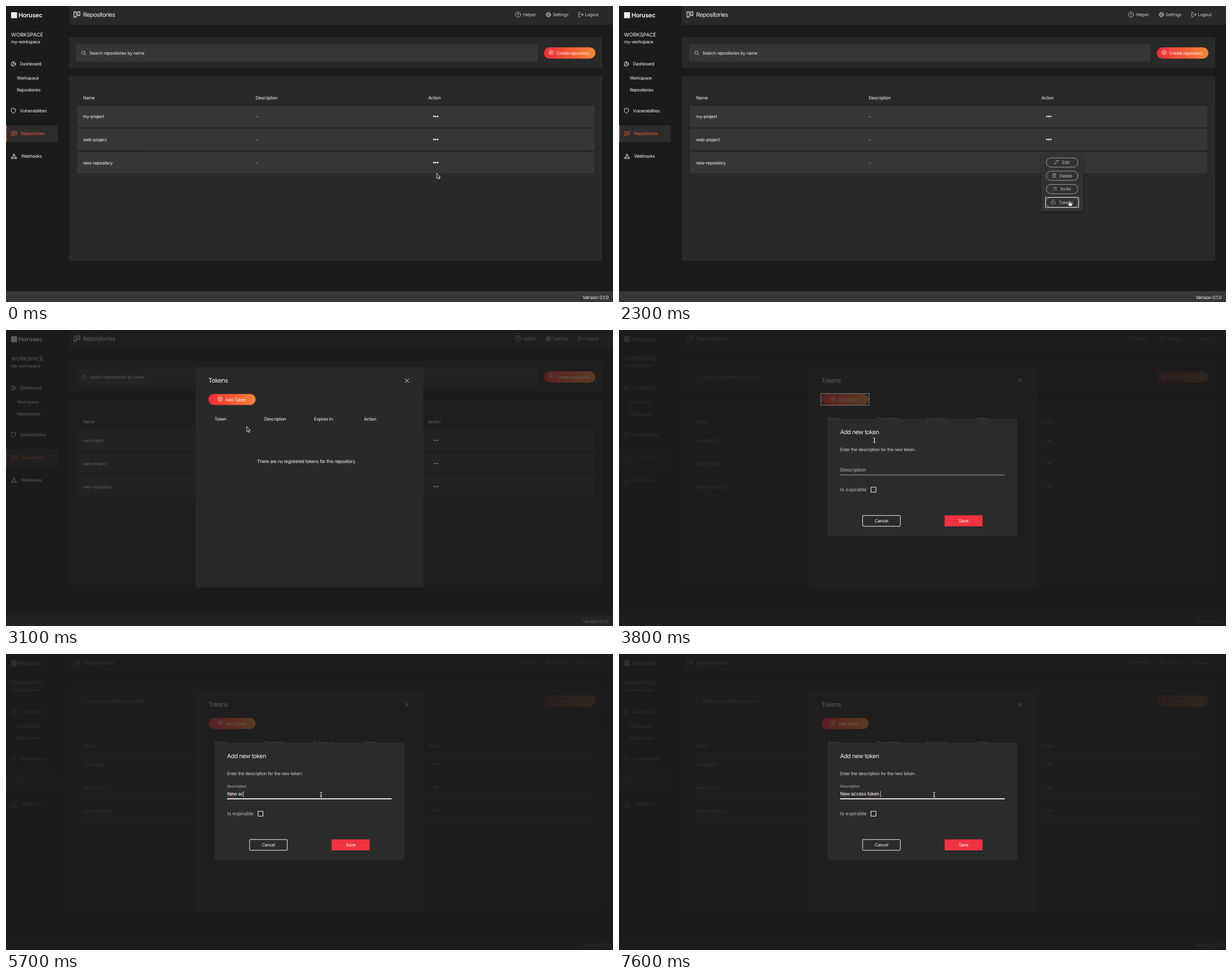
Write an HTML page that moves like this. It is 1071 by 523 pixels and loops after 8000 ms.

```html
<!DOCTYPE html>
<html lang="en">
<head>
<meta charset="utf-8">
<title>Repository tokens</title>
<style>
  html, body { margin: 0; width: 100%; height: 100%; overflow: hidden; background: #1a1c1b; }
  svg { display: block; width: 100vw; height: 100vh; }
  text { font-family: Inter, sans-serif; letter-spacing: -.04em; white-space: pre; text-rendering: geometricPrecision; }
  .form { font-family: "Liberation Sans", Arial, sans-serif; letter-spacing: .0094em; }
  .line { fill: none; stroke-width: .9; stroke-linecap: round; stroke-linejoin: round; }
</style>
</head>
<body>
<svg id="stage" viewBox="0 0 1071 523" preserveAspectRatio="none"></svg>
<script>
const LOOP = 8000, STEP = 100;
const WHITE = '#f4f4f4', SOFT = '#b6b8b8', PANEL = '#282a2a', ROW = '#353737', ACCENT = '#ee5435';

const rect = (x, y, w, h, fill, extra = '') =>
  `<rect x="${x}" y="${y}" width="${w}" height="${h}" fill="${fill}" ${extra}/>`;
// y is the middle of the capital letters
const text = (x, y, str, size = 7.8, fill = WHITE, extra = '') =>
  `<text x="${x}" y="${y + size * .36}" font-size="${size}" fill="${fill}" ${extra}>${str}</text>`;
const icon = (x, y, body, color = WHITE) =>
  `<g class="line" transform="translate(${x} ${y})" stroke="${color}">${body}</g>`;
const group = (id, body, extra = '') => `<g id="${id}" ${extra}>${body}</g>`;

const ICONS = {
  pie: '<circle r="4"/><path d="M0-4V0H4M0 0L-3 2.6"/>',
  shield: '<path d="M0-4.3L3.6-3V0C3.6 2.2 2 3.6 0 4.4C-2 3.6-3.6 2.2-3.6 0V-3Z"/>',
  board: '<path d="M-4-3.7H-.8V3.7H-4ZM1.2-3.7H4.2V1.5H1.2Z"/>',
  hook: '<circle cy="-2.8" r="1.5"/><circle cx="-3.2" cy="2.6" r="1.5"/><circle cx="3.2" cy="2.6" r="1.5"/><path d="M-.8-1.5L-2.6 1.2M.8-1.5L2.6 1.2M-1.6 2.8H1.6"/>',
  help: '<circle r="4.6"/><path d="M-1.4-1.1C-1.2-2.9 1.5-2.7 1.4-1C1.3 0 0 0 0 1.1M0 2.5V2.6"/>',
  gear: '<circle r="1.5"/><circle r="3.4"/><circle r="4.2" stroke-dasharray="1.5 1.8"/>',
  exit: '<path d="M-1.2-3.8H-3.8V3.8H-1.2M-1 0H3.8M2-1.9L3.9 0L2 1.9"/>',
  find: '<circle cx="-.6" cy="-.6" r="2.9"/><path d="M1.6 1.6L3.8 3.8"/>',
  plus: '<circle r="3.8"/><path d="M-1.8 0H1.8M0-1.8V1.8"/>',
  pen: '<path d="M-3.4 3.4L-2.7 1L2-3.6L3.6-2L-1-2.6M-3.4 3.4L-1 2.7L3.6-2"/>',
  bin: '<path d="M-3.2-2.4H3.2M-1.2-2.4V-3.6H1.2V-2.4M-2.5-2.4V3.6H2.5V-2.4M-.9-.8V2M.9-.8V2"/>',
  people: '<circle cx="-1" cy="-1.7" r="1.7"/><path d="M-4 3C-3.6.4 1.6.4 2 3M1.6-3.2C3.4-3 3.4-.6 1.8-.3M2.6.9Q4 1.4 4.2 3"/>',
  lock: '<path d="M-3.2-.6H3.2V3.4H-3.2ZM-2-.6V-2C-2-4.3 2-4.3 2-2"/>'
};
const use = (name, x, y, color) => icon(x, y, ICONS[name], color);

const pillButton = (x, y, w, h, label, iconX, textX) =>
  rect(x, y, w, h, 'url(#fire)', `rx="${h / 2}"`) +
  use('plus', iconX, y + h / 2 - 1, '#ffe3dc') + text(textX, y + h / 2, label, 7.8, '#fff0ea');

const defs = `<defs>
  <linearGradient id="fire"><stop stop-color="#ee2b38"/><stop offset="1" stop-color="#f58735"/></linearGradient>
  <filter id="shadow" x="-20%" y="-20%" width="140%" height="140%"><feDropShadow dx="0" dy="2" stdDeviation="2.5" flood-opacity=".4"/></filter>
  <clipPath id="rippleClip"><rect x="768" y="335" width="48" height="24" rx="8"/></clipPath>
</defs>`;

const sidebar =
  rect(9, 11, 10.5, 10.5, '#eeeeee') +
  text(22, 16.3, 'Horusec', 10.7, '#fff', 'font-weight="600" style="letter-spacing:-.02em"') +
  text(9, 50.3, 'WORKSPACE', 9.1, WHITE, 'style="letter-spacing:0"') + text(9, 63, 'my-workspace') +
  use('pie', 13, 102.5) + text(24.5, 102.3, 'Dashboard') +
  text(19, 127.5, 'Workspace') + text(19, 148.6, 'Repositories') +
  use('shield', 13, 185) + text(24.5, 185, 'Vulnerabilities') +
  rect(0, 210.5, 91.5, 29.5, '#2b2d2d') + rect(0, 210.5, 1.3, 29.5, ACCENT) +
  use('board', 14.5, 225.5, ACCENT) + text(26, 225.3, 'Repositories', 7.9, ACCENT) +
  use('hook', 14, 266) + text(26.7, 265.6, 'Webhooks');

const header = rect(111, 0, 960, 33, PANEL) +
  `<g transform="translate(125 15) scale(1.25)">${use('board', 0, 0)}</g>` + text(136, 15.3, 'Repositories', 10.5) +
  [['help', 903.5, 'Helper', 912], ['gear', 957, 'Settings', 964.5], ['exit', 1014.5, 'Logout', 1021.5]]
    .map(([name, x, label, tx]) => use(name, x, 15.3, '#c6c8c8') + text(tx, 15.3, label, 7.9, '#c6c8c8')).join('');

const search = rect(111, 55, 941, 55, PANEL, 'rx="1.5"') + rect(123.5, 68, 814.5, 30, ROW, 'rx="1.5"') +
  use('find', 137.3, 83, SOFT) + text(147, 83, 'Search repositories by name', 7.8, '#e8e8e8') +
  pillButton(949, 73, 91, 20, 'Create repository', 961.8, 971);

const table = rect(111, 124, 941, 326, PANEL, 'rx="1.5"') +
  [[136, 'Name'], [440.5, 'Description'], [745, 'Action']].map(([x, s]) => text(x, 162.6, s)).join('') +
  ['my-project', 'web-project', 'new-repository'].map((name, i) => {
    const y = 195.3 + i * 40.8;
    return rect(125, y - 19, 913, 37.7, ROW, 'rx="2"') + text(136, y, name) + text(440.7, y, '-') +
      [-3.4, 0, 3.4].map(d => `<circle cx="${758.3 + d}" cy="${y - .2}" r="1.35" fill="#fff"/>`).join('');
  }).join('');

const footer = rect(0, 504, 1071, 19, ROW) + text(1063, 515, 'Version 0.1.0', 8.4, WHITE, 'text-anchor="end"');

const MENU = [['pen', 772, 'Edit', 781.8], ['bin', 768, 'Delete', 777], ['people', 769.3, 'Invite', 779], ['lock', 766.5, 'Tokens', 776.3]];
const menuY = i => 276.5 + i * 23.5;
const menu = rect(745, 261, 74, 102, '#313333', 'rx="2" filter="url(#shadow)"') +
  MENU.map(([name, x, label, tx], i) =>
    `<rect class="pill" x="754" y="${menuY(i) - 8.2}" width="55.8" height="16.4" rx="8.2" fill="none" stroke="#a9abab" stroke-width=".9"/>` +
    use(name, x, menuY(i) - .8, '#8d8f8f') + text(tx, menuY(i), label, 7.9, SOFT)).join('') +
  group('menuRing', rect(752.5, 338, 58.6, 18, 'none', 'stroke="#e0e0e0" stroke-width=".9"')) +
  group('ripple', '<circle cx="793" cy="347" r="23" fill="#fff" fill-opacity=".13"/>', 'clip-path="url(#rippleClip)"');

const tokens = rect(334.5, 66, 402, 389, PANEL) + text(357, 89.3, 'Tokens', 11) +
  group('close', icon(707.3, 89.5, '<path d="M-3.2-3.2L3.2 3.2M3.2-3.2L-3.2 3.2"/>')) +
  group('add', pillButton(357, 113, 83.5, 19.4, 'Add Token', 377.7, 387)) +
  [[368, 'Token'], [455.7, 'Description'], [543.3, 'Expires in:'], [631.5, 'Action']]
    .map(([x, s]) => text(x, 157, s)).join('') +
  text(443, 231.6, 'There are no registered tokens for this repository.', 8.18);

const wave = (id) => `<path id="${id}" stroke="#c8283a" stroke-width=".9" stroke-dasharray="1 .7" fill="none"/>`;
const dialog = rect(368, 157, 335, 207, '#2a2c2c') + text(390, 180.3, 'Add new token', 10.5) +
  text(390, 210.8, 'Enter the description for the new token:', 7.8, '#d0d2d2') +
  `<text id="label" class="form" font-size="8.93" fill="#bcbebe">Description</text>` +
  rect(390, 255.7, 290.5, .8, '#c4c6c6') + rect(390, 255, 290.5, 1.5, '#fff', 'id="underline"') +
  text(390.2, 247.3, '', 8.6, '#fff', 'id="typed"') + wave('wave1') + wave('wave2') +
  rect(0, 242.3, .7, 10.4, '#fff', 'id="caret"') +
  text(390.2, 281.5, 'Is expirable', 8.93, '#bcbebe', 'class="form"') +
  rect(444.6, 277.7, 8.8, 8.8, 'none', 'stroke="#f0f0f0" stroke-width="1.1" rx=".6"') +
  rect(429.8, 327.8, 66.5, 19, 'none', 'stroke="#f0f0f0" stroke-width="1" rx="1"') +
  text(463, 337.4, 'Cancel', 7.8, WHITE, 'text-anchor="middle"') +
  rect(574.5, 327.4, 67, 19.6, '#ef3340', 'rx="1"') + text(608, 337.4, 'Save', 7.8, '#fff', 'text-anchor="middle"');

const shade = rect(0, 0, 1071, 523, '#1a1c1b', 'fill-opacity=".7"');
const cursors =
  group('arrow', '<path d="M0 0V9L2.1 7.1L3.6 10.3L5 9.7L3.6 6.6H6.4Z" fill="#222" stroke="#fff" stroke-width=".8"/>') +
  group('hand', '<path d="M-.8.6C-.8-.3.6-.3.6.6V3.6L4 4.4C4.9 4.7 5 5.2 4.8 6L4 9.6H-.7L-3.2 6.2C-3.6 5.4-2.6 4.9-2 5.5L-.8 6.6Z" fill="#fff" stroke="#222" stroke-width=".5"/>') +
  group('beam', '<path d="M-1.8-4.2Q0-4.2 0-3.2Q0-4.2 1.8-4.2M0-3.4V3.4M-1.8 4.2Q0 4.2 0 3.2Q0 4.2 1.8 4.2M-1 1.2H1" fill="none" stroke="#f2f2f2" stroke-width="1"/>');

const stage = document.getElementById('stage');
stage.innerHTML = defs + sidebar + header + search + table + footer +
  group('tokens', shade + tokens) + group('menu', menu) +
  group('dialog', shade + dialog) +
  rect(356.2, 112.2, 85, 20.8, 'none', 'id="addRing" stroke="#9a9c9c" stroke-width=".8"') +
  group('pointer', cursors);

const $ = id => document.getElementById(id);
const pills = [...document.querySelectorAll('.pill')];
const set = (el, attrs) => { for (const key in attrs) el.setAttribute(key, attrs[key]); };
const show = (id, on) => $(id).setAttribute('visibility', on ? 'inherit' : 'hidden');
const ramp = (t, from, to) => Math.min(1, Math.max(0, (t - from) / (to - from)));

// time, x, y of the pointer's hot spot
const PATH = [
  [0, 760, 295.7], [300, 761, 278.5], [600, 761, 278.5], [1100, 777.3, 281.2], [1400, 783, 292],
  [2000, 795, 344], [2400, 795, 344], [3000, 432, 187], [3300, 404, 124], [3700, 404, 124],
  [3800, 450.5, 195], [4300, 556, 248.7]
];
const TYPED = [
  [0, ''], [4900, 'N'], [5100, 'Ne'], [5200, 'New'], [5300, 'New '], [5500, 'New a'], [5700, 'New ac'],
  [5900, 'New acc'], [6000, 'New acces'], [6200, 'New access'], [6400, 'New access '], [6600, 'New access t'],
  [6800, 'New access to'], [6900, 'New access tok'], [7100, 'New access token'], [7600, 'New access token ']
];

function pointerAt(t) {
  const i = PATH.findLastIndex(p => p[0] <= t);
  const [t0, x0, y0] = PATH[i], [t1, x1, y1] = PATH[i + 1] || [t0 + 1, x0, y0];
  const u = ramp(t, t0, t1), k = u * u * (3 - 2 * u);
  return [x0 + (x1 - x0) * k, y0 + (y1 - y0) * k];
}

function drawPointer(t, x, y) {
  const onAdd = t >= 3200 && t < 3800;
  const kind = t >= 3800 ? 'beam' : (t >= 300 && t < 2500) || onAdd ? 'hand' : 'arrow';
  for (const id of ['arrow', 'hand', 'beam']) show(id, id === kind);
  set($('pointer'), { transform: `translate(${x} ${y})` });
  set($('add'), { transform: onAdd ? 'translate(398.7 122.7) scale(1.035) translate(-398.7 -122.7)' : '' });
}

function drawMenu(t, y) {
  show('menu', t >= 600 && t < 2600);
  set($('menu'), { opacity: t < 700 ? .7 : t >= 2500 ? .3 : 1 });
  show('menuRing', t >= 2200);
  show('ripple', t >= 2400);
  pills.forEach((pill, i) => {
    const grow = t >= 700 && Math.abs(y - menuY(i)) < 9 ? 1.2 : 0;
    set(pill, { x: 754 - grow, width: 55.8 + grow * 2, y: menuY(i) - 8.2 - grow / 3, height: 16.4 + grow * 2 / 3 });
  });
}

function drawDialog(t) {
  show('dialog', t >= 3800);
  const k = ramp(t, 4200, 4500);
  set($('label'), { transform: `translate(390.2 ${250.4 - 14 * k}) scale(${1 - .25 * k})` });
  set($('underline'), { x: 535.25 - 145.25 * k, width: 290.5 * k });

  const value = TYPED.findLast(([at]) => at <= t)[1], field = $('typed');
  field.textContent = value;
  const widthOf = n => n ? field.getSubStringLength(0, n) : 0;
  set($('caret'), { x: 390.2 + widthOf(value.length) });
  show('caret', (t >= 4300 && t < 4700) || t >= 4900);
  const mark = (id, from, to, on) => {
    show(id, on);
    if (on) set($(id), { d: `M${391 + widthOf(from)} 252.6H${390 + widthOf(to)}` });
  };
  mark('wave1', 0, 3, t >= 5400);
  mark('wave2', 11, 16, t >= 7600);
}

function draw(now) {
  const t = Math.floor((now % LOOP) / STEP) * STEP;
  const [x, y] = pointerAt(t);
  show('tokens', t >= 2400);
  show('close', t >= 2500);
  show('addRing', t >= 3600 && t < 4300);
  drawMenu(t, y);
  drawDialog(t);
  drawPointer(t, x, y);
}

const start = performance.now();
(function frame() {
  draw(performance.now() - start);
  requestAnimationFrame(frame);
})();
</script>
</body>
</html>
```
